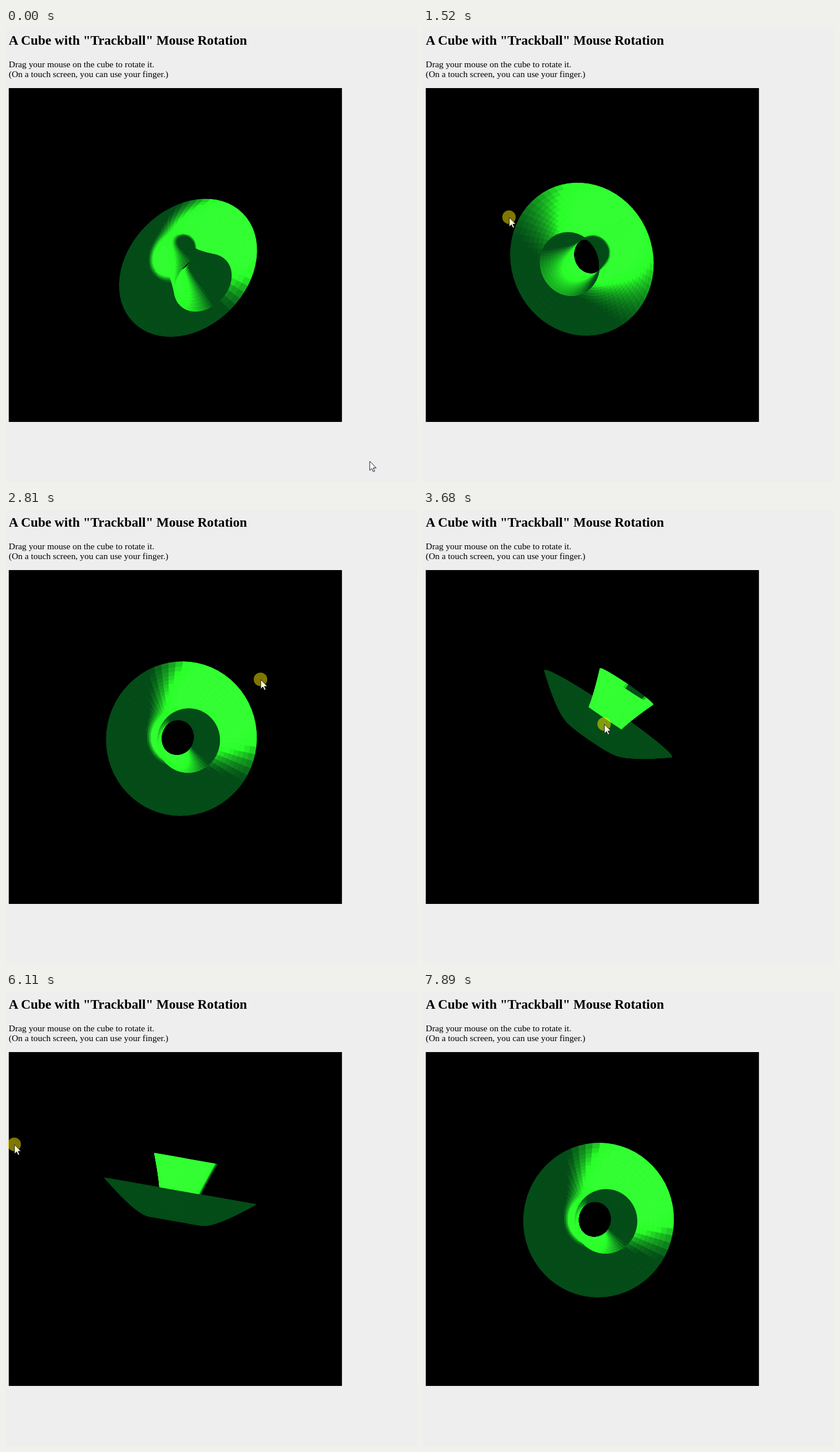
These frames come from a looping animation (713 by 786 pixels, 8 s). An HTML page with a canvas:

```html
<!DOCTYPE html>
<html lang="en">
<head>
<meta charset="utf-8">
<title>Trackball rotation</title>
<style>
  html, body { margin: 0; width: 100%; height: 100%; overflow: hidden; background: #eee; }
  canvas, svg { position: absolute; left: 0; top: 0; width: 713px; height: 786px; }
  text { font: 15.4px "Liberation Serif", "Times New Roman", serif; fill: #000; }
  .title { font-size: 23.1px; font-weight: bold; }
</style>
</head>
<body>
<svg viewBox="0 0 713 786">
  <text class="title" x="4.8" y="29">A Cube with "Trackball" Mouse Rotation</text>
  <text x="4.8" y="68">Drag your mouse on the cube to rotate it.</text>
  <text x="4.8" y="85">(On a touch screen, you can use your finger.)</text>
</svg>
<canvas width="713" height="786"></canvas>
<script>
const ctx = document.querySelector('canvas').getContext('2d');
const LOOP = 8000, LEFT = 4.8, TOP = 104, SIZE = 578;
const SLICES = 64, RINGS = 40;
const LIGHT = [80, 80, -47], LIGHT_POWER = 480;

// Key poses of the surface: time, sideways lean of its axis, tilt in degrees
const POSES = [
  [640, .45, -30.5], [1520, -.37, -9.2], [2140, -.16, -58], [3680, .56, 84.5],
  [5140, .21, 99.5], [5880, .21, 99.5], [6930, -.09, 10.4], [7480, .22, -2.3]
];

// Key points of the pointer: time, x, y
const POINTER = [
  [40, 631, 750], [300, 408, 420], [640, 407, 418], [1520, 150, 328], [1680, 95, 345],
  [2140, 291, 526], [3150, 470, 211], [3680, 315, 371], [4760, 4, 246], [5140, 336, 326],
  [5540, 335, 308], [5800, -14, 246], [6930, 195, 381], [7560, 285, 445], [7890, 640, 810]
];
const isPressed = t => t >= 640 && t < 7540 && !(t > 5520 && t < 5860);

const dot = (a, b) => a[0] * b[0] + a[1] * b[1] + a[2] * b[2];
const cross = (a, b) => [a[1] * b[2] - a[2] * b[1], a[2] * b[0] - a[0] * b[2], a[0] * b[1] - a[1] * b[0]];
const unit = a => { const l = Math.hypot(...a); return a.map(v => v / l); };
const clamp = v => Math.max(0, Math.min(1, v));

// Monotone cubic interpolation between keys, so that holds stay still
function sample(keys, t) {
  let i = 0;
  while (i < keys.length - 2 && t >= keys[i + 1][0]) i++;
  const a = keys[i], b = keys[i + 1], span = b[0] - a[0], s = clamp((t - a[0]) / span);
  const slope = (k, c) => k < 0 || k > keys.length - 2 ? 0 :
    (keys[k + 1][c] - keys[k][c]) / (keys[k + 1][0] - keys[k][0]);
  const tangent = (k, c) => {
    const p = slope(k - 1, c), q = slope(k, c);
    return p * q > 0 ? 2 * p * q / (p + q) : 0;
  };
  return [1, 2].map(c => {
    const d = b[c] - a[c], m0 = tangent(i, c) * span, m1 = tangent(i + 1, c) * span;
    return a[c] + s * m0 + s * s * (3 * d - 2 * m0 - m1) + s * s * s * (m0 + m1 - 2 * d);
  });
}

function axisOf([lean, degrees]) {
  const tilt = degrees * Math.PI / 180, rest = Math.sqrt(1 - lean * lean);
  return [lean, rest * Math.sin(tilt), rest * Math.cos(tilt)];
}

// Profile as [radius, height], one Bezier curve: tube end, neck, trough, wide rim
function profile(t) {
  const s = 1 - t, weights = [s * s * s, 3 * s * s * t, 3 * s * t * t, t * t * t];
  const mix = points => weights.reduce((sum, w, i) => sum + w * points[i], 0);
  return [mix([55.5, 13, 18, 133.5]), mix([106, -4, -45, 49])];
}
const rings = Array.from({ length: RINGS + 1 }, (_, i) => profile(i / RINGS));

function shade(level) {
  const t = clamp(level), glow = clamp(level - 1) * 9;
  return `rgb(${4 + 38 * t + glow | 0},${76 + 179 * t | 0},${24 + 18 * t + glow | 0})`;
}

function drawSurface(axis) {
  const u = unit(cross(axis, [1, -1, 0])), v = cross(axis, u);
  const around = angle => u.map((k, i) => k * Math.cos(angle) + v[i] * Math.sin(angle));
  const place = (radial, [r, z]) => radial.map((k, i) => k * r + axis[i] * z);
  const step = 2 * Math.PI / SLICES, quads = [];

  for (let j = 0; j < SLICES; j++) {
    const left = around(j * step), right = around((j + 1) * step), mid = around((j + .5) * step);
    for (let i = 0; i < RINGS; i++) {
      const p = rings[i], q = rings[i + 1];
      const normal = unit(place(mid, [q[1] - p[1], p[0] - q[0]]));
      const centre = place(mid, [(p[0] + q[0]) / 2, (p[1] + q[1]) / 2]);
      const toLight = LIGHT.map((k, n) => k - centre[n]);
      quads.push({
        depth: centre[2],
        color: shade(LIGHT_POWER * dot(normal, toLight) / dot(toLight, toLight)),
        points: [place(left, p), place(right, p), place(right, q), place(left, q)]
      });
    }
  }

  quads.sort((a, b) => a.depth - b.depth);
  ctx.lineWidth = 1;
  ctx.lineJoin = 'round';
  for (const { points, color } of quads) {
    ctx.beginPath();
    for (const [x, y] of points) ctx.lineTo(LEFT + SIZE / 2 + x, TOP + SIZE / 2 - y);
    ctx.closePath();
    ctx.fillStyle = ctx.strokeStyle = color;
    ctx.fill();
    ctx.stroke();
  }
}

const arrow = new Path2D('M0 0V16L3.7 12.6L6.3 18.2L8.7 17.1L6.2 11.6H11.3Z');
function drawPointer([x, y], pressed) {
  if (pressed) {
    ctx.fillStyle = 'rgba(255,236,0,.5)';
    ctx.beginPath();
    ctx.arc(x - .5, y - .5, 11.7, 0, 2 * Math.PI);
    ctx.fill();
  }
  ctx.save();
  ctx.translate(x, y);
  ctx.fillStyle = pressed ? '#ffffc8' : '#fff';
  ctx.strokeStyle = '#101830';
  ctx.lineWidth = 1;
  ctx.fill(arrow);
  ctx.stroke(arrow);
  ctx.restore();
}

function draw(now) {
  const t = now % LOOP;
  ctx.clearRect(0, 0, 713, 786);
  ctx.fillStyle = '#000';
  ctx.fillRect(LEFT, TOP, SIZE, SIZE);
  drawSurface(axisOf(sample(POSES, t)));
  drawPointer(sample(POINTER, t), isPressed(t));
}

const start = performance.now();
function tick() {
  draw(performance.now() - start);
  requestAnimationFrame(tick);
}
tick();
</script>
</body>
</html>
```
